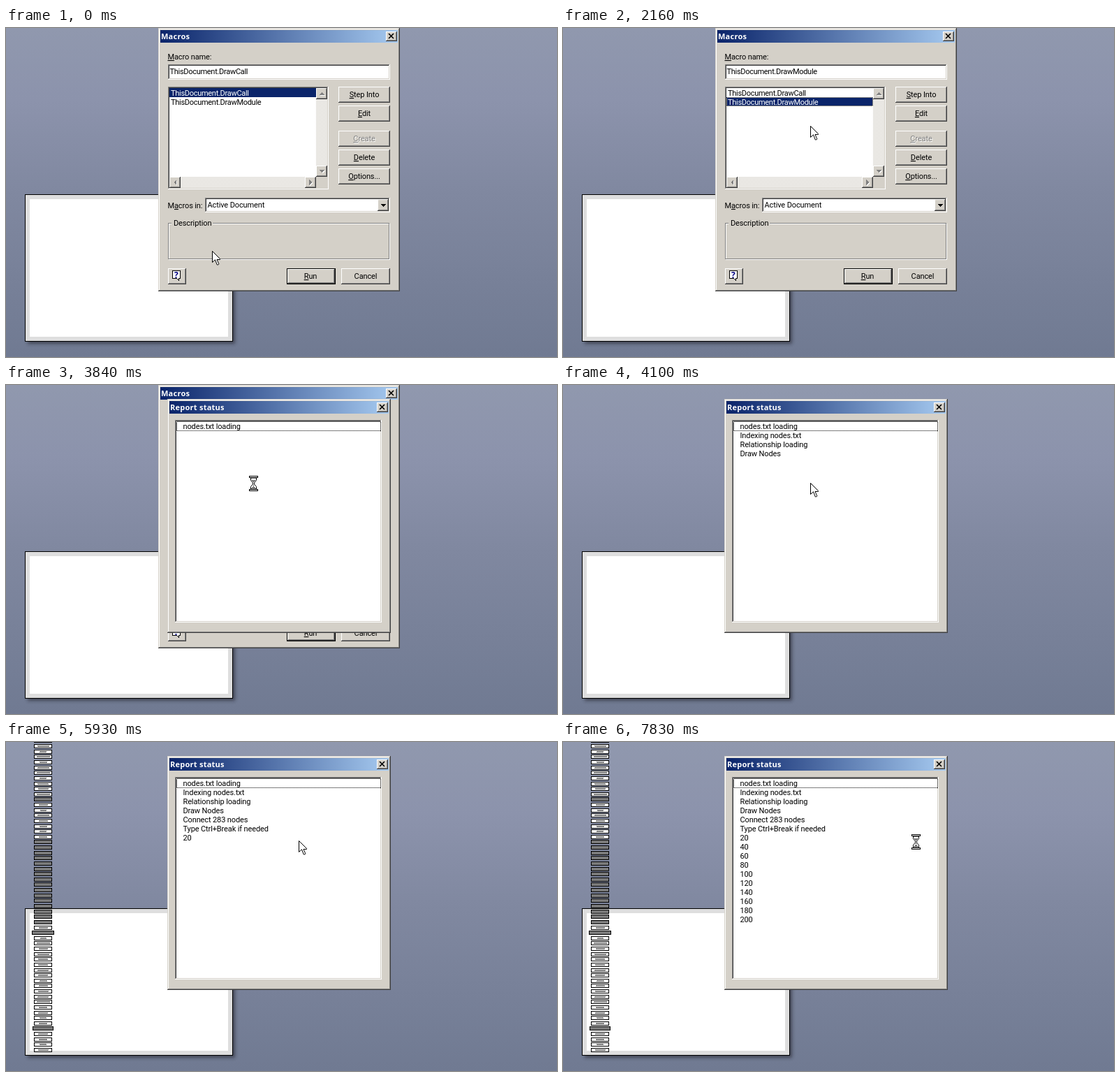
An HTML page for the animation above (8 s loop, 789 px wide and 471 px high).

```html
<!DOCTYPE html>
<html lang="en">
<head>
<meta charset="utf-8">
<title>Macros</title>
<style>
  html, body { margin: 0; width: 100%; height: 100%; overflow: hidden; background: #7f88a0; }
  svg { display: block; width: 789px; height: 471px; }
  text { font: 11px Roboto, "Noto Sans", sans-serif; letter-spacing: -0.12px; }
  .tight { letter-spacing: -0.29px; }
  .title { font: bold 11px "Noto Sans", sans-serif; letter-spacing: 0.25px; fill: #fff; }
  .mark { font: bold 12px "Noto Sans", sans-serif; fill: #000080; }
</style>
</head>
<body>
<svg id="stage" viewBox="0 0 789 471" shape-rendering="crispEdges">
  <defs>
    <linearGradient id="sky" x1="0" y1="0" x2="0" y2="1">
      <stop offset="0" stop-color="#9098ae"/>
      <stop offset=".22" stop-color="#8c93ac"/>
      <stop offset=".5" stop-color="#8088a0"/>
      <stop offset="1" stop-color="#707a92"/>
    </linearGradient>
    <linearGradient id="bar">
      <stop offset="0" stop-color="#0a246a"/>
      <stop offset="1" stop-color="#a6caf0"/>
    </linearGradient>
    <pattern id="track" width="2" height="2" patternUnits="userSpaceOnUse">
      <rect width="2" height="2" fill="#fff"/>
      <path d="M0 0h1v1h1v1h-1v-1h-1z" fill="#d4d0c8"/>
    </pattern>
    <pattern id="dense" width="2" height="2" patternUnits="userSpaceOnUse">
      <rect width="2" height="2" fill="#a8a8a8"/>
      <path d="M0 0h1v1h1v1h-1v-1h-1z" fill="#4c4c4c"/>
    </pattern>
    <filter id="blur" x="-10%" y="-10%" width="120%" height="120%">
      <feGaussianBlur stdDeviation="2.5"/>
    </filter>
  </defs>
</svg>
<script>
const LOOP = 8000;
const FACE = '#d4d0c8', WHITE = '#fff', GREY = '#808080', DARK = '#404040', NAVY = '#0a246a';
const stage = document.getElementById('stage');
const $ = id => document.getElementById(id);

const rect = (x, y, w, h, fill, more = '') =>
  `<rect x="${x}" y="${y}" width="${w}" height="${h}" fill="${fill}" ${more}/>`;
const path = (d, fill, more = '') => `<path d="${d}" fill="${fill}" ${more}/>`;
const group = (id, body) => `<g id="${id}">${body}</g>`;

// "&" marks the underlined access key
const text = (x, y, s, more = '') =>
  `<text x="${x}" y="${y}" ${more}>${s.replace(/&(.)/, '<tspan text-decoration="underline">$1</tspan>')}</text>`;

// two-pixel edge: outer and inner colours for top/left and bottom/right
function edge(x, y, w, h, fill, tl, br, tl2, br2) {
  return rect(x, y, w, h, br) + rect(x, y, w - 1, h - 1, tl) +
    rect(x + 1, y + 1, w - 2, h - 2, br2) + rect(x + 1, y + 1, w - 3, h - 3, tl2) +
    rect(x + 2, y + 2, w - 4, h - 4, fill);
}
const raised = (x, y, w, h) => edge(x, y, w, h, FACE, WHITE, DARK, FACE, GREY);
const sunken = (x, y, w, h) => edge(x, y, w, h, WHITE, GREY, WHITE, DARK, FACE);
const frame = (x, y, w, h) => edge(x, y, w, h, FACE, FACE, DARK, WHITE, GREY);
const dotted = (id, x, y, w, h, color) =>
  rect(x + .5, y + .5, w - 1, h - 1, 'none', `id="${id}" stroke="${color}" stroke-dasharray="1 1"`);

function dialog(x, y, w, h, title) {
  const bx = x + w - 20, by = y + 5;
  return frame(x, y, w, h) + rect(x + 3, y + 3, w - 6, 18, 'url(#bar)') +
    text(x + 4, y + 16, title, 'class="title"') + raised(bx, by, 16, 14) +
    path(`M${bx + 4} ${by + 3}l7 7m0 -7l-7 7`, 'none',
      'stroke="#000" stroke-width="1.6" shape-rendering="auto"');
}

function button(x, y, w, h, label, off) {
  const cx = x + w / 2, base = y + 15, mid = 'text-anchor="middle"';
  return raised(x, y, w, h) + (off
    ? text(cx + 1, base + 1, label, mid + ' fill="#fff"') + text(cx, base, label, mid + ' fill="#808080"')
    : text(cx, base, label, mid));
}

function scrollButton(x, y, turn) {
  const tip = (d, color) => path('M-4 2L0 -2L4 2z', color,
    `transform="translate(${x + 8 + d} ${y + 8 + d}) rotate(${turn})"`);
  return raised(x, y, 16, 16) + tip(1, WHITE) + tip(0, GREY);
}

function page() {
  return rect(31, 242, 297, 210, '#20242c', 'opacity=".6" filter="url(#blur)"') +
    rect(27, 238, 298, 211, '#000') + rect(28, 239, 296, 209, '#dedede') +
    rect(34, 245, 284, 197, WHITE);
}

// stack of tiny labelled boxes
function nodes() {
  let out = '', seed = 7;
  for (let i = 0; i < 59; i++) {
    const y = Math.round(441 - 7.63 * i) - 3;
    const wide = i === 22 ? 3 : i === 4 ? 2 : 0;
    const full = wide || i === 47 || (i > 23 && i < 40);
    const x = 40 - wide, w = 26 + 2 * wide;
    seed = seed * 73 % 101;
    const len = 9 + seed % 11;
    out += rect(x, y, w, 6, '#000') + rect(x + 1, y + 1, w - 2, 4, WHITE) +
      (full ? rect(x + 1, y + 1, w - 2, 4, 'url(#dense)')
            : rect(53 - (len >> 1), y + 2, len, 2, 'url(#dense)'));
  }
  return out;
}

function macros() {
  const row = (n, y, name) => rect(234, y, 210, 13, NAVY, `id="sel${n}"`) +
    text(236, y + 11, 'ThisDocument.' + name, `id="row${n}" class="tight"`) +
    dotted('focus' + n, 234, y, 210, 13, '#f5db95');
  return dialog(218, 0, 346, 377, 'Macros') +
    text(231.5, 45, '&Macro name:') + sunken(232, 52, 318, 22) +
    text(234.5, 66, '', 'id="field" class="tight"') + rect(235, 55, 1, 13, '#000', 'id="caret"') +
    sunken(232, 84, 230, 147) + row(0, 86, 'DrawCall') + row(1, 99, 'DrawModule') +
    rect(444, 86, 16, 127, 'url(#track)') + rect(234, 213, 210, 16, 'url(#track)') +
    rect(444, 213, 16, 16, FACE) +
    scrollButton(444, 86, 0) + scrollButton(444, 197, 180) +
    scrollButton(234, 213, -90) + scrollButton(428, 213, 90) +
    button(476, 84, 74, 23, '&Step Into') + button(476, 111, 74, 23, '&Edit') +
    button(476, 147, 74, 23, '&Create', true) + button(476, 174, 74, 23, '&Delete') +
    button(476, 201, 74, 23, '&Options...') +
    text(231.5, 258, 'M&acros in:') + sunken(285, 243, 265, 21) +
    text(288.5, 257, 'Active Document') + raised(532, 245, 16, 17) +
    path('M536 252h8l-4 4z', '#000') +
    rect(233.5, 280.5, 316, 51, 'none', 'stroke="#fff"') +
    rect(232.5, 279.5, 316, 51, 'none', 'stroke="#808080"') +
    rect(237, 278, 59, 4, FACE) + text(240, 283, 'Description') +
    raised(232, 344, 26, 23) +
    path('M238.5 347.5h11v11h-2v3l-3 -3h-6z', WHITE, 'stroke="#000"') +
    text(241, 358, '?', 'class="mark"') +
    rect(402, 344, 70, 23, '#000') + button(403, 345, 68, 21, '') +
    text(436, 359, '&Run', 'text-anchor="middle"') + button(480, 344, 70, 23, 'Cancel');
}

const lines = ['nodes.txt loading', 'Indexing nodes.txt', 'Relationship loading',
  'Draw Nodes', 'Connect 283 nodes', 'Type Ctrl+Break if needed'];
for (let n = 20; n <= 200; n += 20) lines.push(String(n));

function report() {
  return dialog(231, 20, 320, 335, 'Report status') + sunken(242, 50, 296, 290) +
    lines.map((s, i) => text(253.5, 63 + 13 * i, s, `id="line${i}"`)).join('') +
    dotted('first', 244, 52, 293, 14, '#000');
}

const arrow = path('M.5 .5V16.5L4.5 12.8L7.3 20H8.8L9.8 18.8L7 12.5H11.5V11.5z', WHITE,
  'stroke="#000" shape-rendering="auto"');
const glass =
  path('M2.5 3V6.5L5.5 10V12L2.5 15.5V19H10.5V15.5L7.5 12V10L10.5 6.5V3z', WHITE,
    'stroke="#000" shape-rendering="auto"') +
  rect(0, 0, 13, 3, '#000') + rect(1, 1, 11, 1, WHITE) +
  rect(0, 19, 13, 3, '#000') + rect(1, 20, 11, 1, WHITE) +
  path('M4 6h1v1h-1zM6 6h1v1h-1zM8 6h1v1h-1zM5 7h1v1h-1zM7 7h1v1h-1zM6 8h1v1h-1z' +
    'M6 13h1v1h-1zM6 15h1v1h-1zM5 16h1v1h-1zM7 16h1v1h-1zM4 17h1v1h-1zM6 17h1v1h-1zM8 17h1v1h-1z', '#000');

stage.insertAdjacentHTML('beforeend',
  rect(0, 0, 789, 471, 'url(#sky)') + page() + group('nodes', nodes()) +
  group('macros', macros()) + group('report', report()) +
  group('arrow', arrow) + group('glass', glass));

// time, pointer shape, left, top
const pointer = [
  [0, 'arrow', 295, 319], [270, 'arrow', 276, 209], [540, 'arrow', 325, 132],
  [830, 'arrow', 354, 140], [3560, 'glass', 348, 130], [4100, 'arrow', 354, 140],
  [5410, 'glass', 348, 130], [5680, 'arrow', 354, 140], [5930, 'arrow', 419, 141],
  [6210, 'glass', 499, 132]
];
// time, number of report lines
const progress = [[0, 0], [3840, 1], [4100, 4], [5410, 6], [5930, 7], [6210, 9], [6490, 10],
  [6740, 11], [7000, 12], [7270, 14], [7560, 15], [7830, 16]];

const at = (steps, t) => steps.filter(s => s[0] <= t).pop();
const show = (id, on) => $(id).setAttribute('visibility', on ? 'inherit' : 'hidden');

function draw(t) {
  const picked = t < 2160 ? 0 : 1;
  for (const n of [0, 1]) {
    show('sel' + n, n === picked);
    show('focus' + n, n === picked && t >= 1620 && t < 3560);
    $('row' + n).setAttribute('fill', n === picked ? WHITE : '#000');
  }
  $('field').textContent = $('row' + picked).textContent;
  show('caret', t >= 540 && t < 1100);
  show('macros', t < 4100);
  show('report', t >= 3840);
  show('nodes', t >= 5930);

  const count = at(progress, t)[1];
  lines.forEach((_, i) => show('line' + i, i < count));

  const [, shape, x, y] = at(pointer, t);
  for (const id of ['arrow', 'glass']) show(id, id === shape);
  $(shape).setAttribute('transform', `translate(${x} ${y})`);
}

const start = performance.now();
function tick() {
  draw((performance.now() - start) % LOOP);
  requestAnimationFrame(tick);
}
tick();
</script>
</body>
</html>
```
